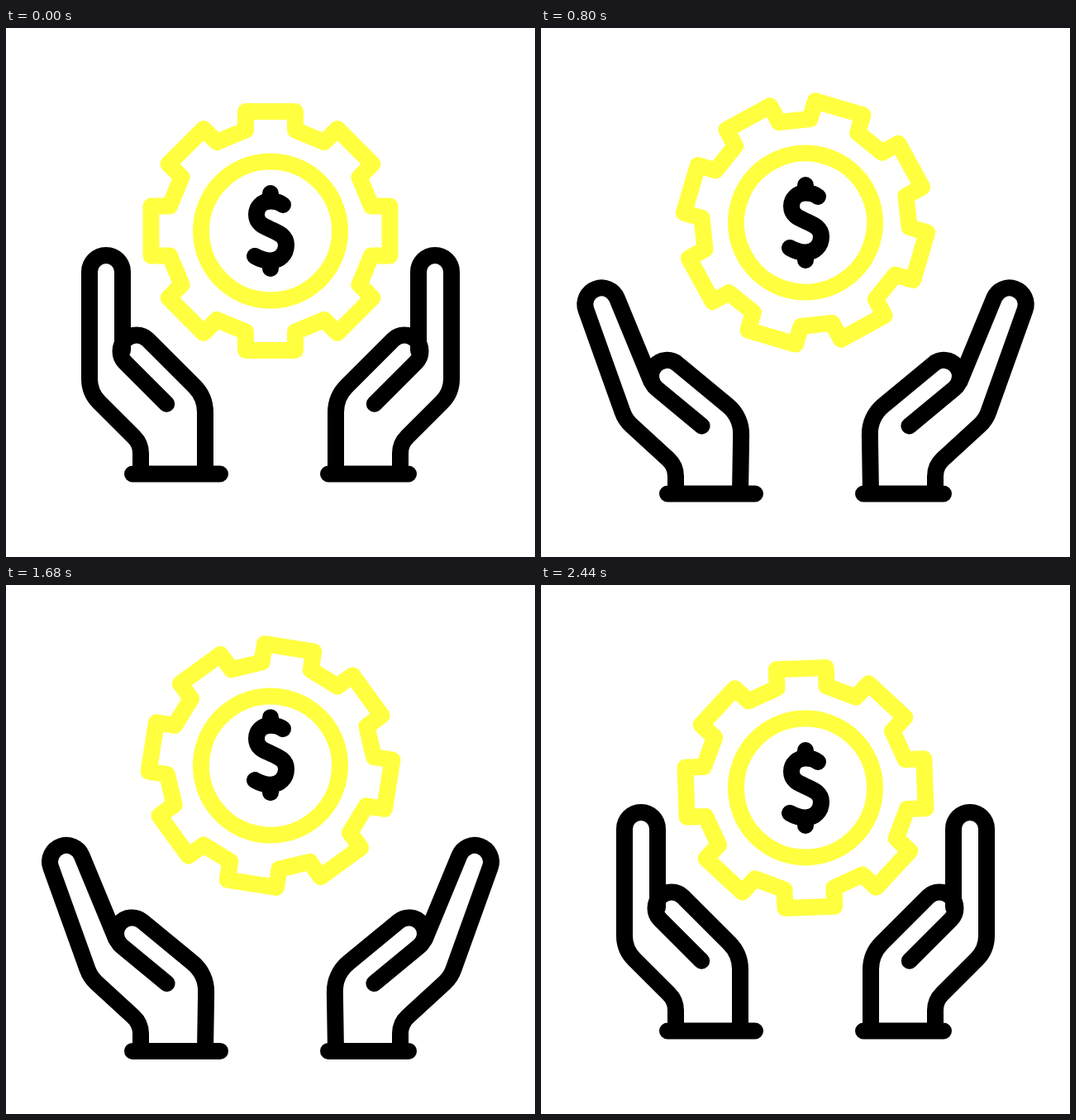
An HTML page with a canvas that plays this animation: 640 px wide and 640 px high, repeating every 2.48 s.

```html
<!DOCTYPE html>
<html lang="en">
<head>
<meta charset="utf-8">
<title>Hands and gear</title>
<style>
  html, body { margin: 0; width: 100%; height: 100%; overflow: hidden; background: #fff; }
  canvas { display: block; width: 100vmin; height: 100vmin; }
</style>
</head>
<body>
<canvas id="stage" width="640" height="640"></canvas>
<script>
const ctx = document.getElementById('stage').getContext('2d');
const STEP = 40, STEPS = 62;
const BLACK = '#000', YELLOW = '#ffff40';
const DIP = 19, THROW = 29.5, REACH = 42.5, CATCH = 50, REST = 57;

const rad = deg => deg * Math.PI / 180;
const ease = u => u * u * (3 - 2 * u);

// Starts at 0 and eases to each [time, value]; warp > 1 delays a move, < 1 hastens it.
function track(...moves) {
  return t => {
    let start = 0, from = 0;
    for (const [end, value, warp = 1] of moves) {
      if (t < end) {
        const u = Math.max(0, (t - start) / (end - start));
        return from + (value - from) * ease(u ** warp);
      }
      start = end;
      from = value;
    }
    return from;
  };
}

// Every part of the hands opens fully twice, around the throw and before the catch.
const handTrack = (thrown, caught, windUp) =>
  track([DIP, 1, windUp], [THROW, thrown], [REACH, 1], [CATCH, caught], [REST, 0]);

const drop = handTrack(0.16, -0.27, 2.4);
const fingerBend = handTrack(0.72, -0.16, 2.3);
const palmBend = handTrack(0.42, -0.85, 3.7);
const gearY = track([10, 24], [36, -31, 0.57], [49.5, 23, 2.2], [REST, 0]);
const coinY = t => 1.37 * gearY(t - 1);

// Six teeth per loop, slow near the rest pose and fastest after the throw.
function gearAngle(t) {
  const w = 2 * Math.PI * t / STEPS;
  return 270 * t / STEPS
    - 19.9 * Math.sin(w) - 9.5 * (1 - Math.cos(w))
    - 2.7 * Math.sin(2 * w) + 2.4 * (1 - Math.cos(2 * w))
    + Math.sin(3 * w);
}

function swishAngle(t, start, end) {
  const u = Math.min(1, Math.max(0, (t - start) / (end - start)));
  return -60 + 120 * ease(u);
}

function drawGear(y, angle) {
  ctx.save();
  ctx.translate(320, 245.5 + y);
  ctx.rotate(rad(angle));
  ctx.strokeStyle = YELLOW;
  ctx.beginPath();
  for (let i = 0; i < 8; i++) {
    ctx.lineTo(-30, -122);
    ctx.lineTo(-30, -144.5);
    ctx.lineTo(30, -144.5);
    ctx.lineTo(30, -122);
    ctx.rotate(Math.PI / 4);
  }
  ctx.closePath();
  ctx.moveTo(84, 0);
  ctx.arc(0, 0, 84, 0, 2 * Math.PI);
  ctx.stroke();
  ctx.restore();
}

const dollar = new Path2D('M15-31.5C11-35 5-36 0-36C-10-36-17-29-17-20C-17-9-9-6 1-1.5' +
  'C11 3 19 6.5 19 17C19 28 11 36 0 36C-7 36-13 34-19 30.5M0-45.5V-37M0 37V45.5');

function drawDollar(y) {
  ctx.save();
  ctx.translate(320, 245.5 + y);
  ctx.stroke(dollar);
  ctx.restore();
}

function drawSwish(tail, head) {
  if (head - tail < 0.5) return;
  ctx.beginPath();
  ctx.arc(320.8, 226.6, 194.6, rad(tail - 90), rad(head - 90));
  ctx.stroke();
}

function drawHand(t, cuffEnd) {
  const finger = fingerBend(t), palm = palmBend(t);
  const tipX = 121 - 48 * finger, tipY = 295 + 15.5 * Math.max(0, finger);
  const left = rad(20 * finger), right = rad(23 * finger);
  const knuckleX = 101 + palm, knuckleY = 441 + 9 * palm;
  const thumbX = 158 - 5.5 * palm, thumbY = 391 + 6.5 * palm, thumbR = 19.5;
  const lean = rad(45 - 5.5 * palm), c = Math.cos(lean), s = Math.sin(lean);
  const startX = thumbX - thumbR * s, startY = thumbY + thumbR * c;
  const heelX = 241 + 1.5 * palm;
  const heelY = thumbY - thumbR * c + (heelX - thumbX - thumbR * s) * s / c;

  ctx.save();
  ctx.translate(0, 539.5 + 24.5 * drop(t));
  ctx.beginPath();
  // Cuff
  ctx.moveTo(153, 0);
  ctx.lineTo(cuffEnd, 0);
  ctx.translate(0, -539.5);
  // Finger and outer edge of the palm
  ctx.moveTo(163, 539.5);
  ctx.arcTo(163, 503 + 3 * palm, knuckleX, knuckleY, 28);
  ctx.arcTo(knuckleX, knuckleY, tipX - 20 * Math.cos(left), tipY + 20 * Math.sin(left), 40);
  ctx.arc(tipX, tipY, 20, Math.PI - left, 2 * Math.PI - right);
  ctx.lineTo(thumbX - 17 - 2 * palm, thumbY - 1 + 8 * palm);
  // Thumb and inner edge of the palm
  ctx.moveTo(startX + 70.7 * c, startY + 70.7 * s);
  ctx.lineTo(startX, startY);
  ctx.arc(thumbX, thumbY, thumbR, lean + Math.PI / 2, lean + 1.5 * Math.PI);
  ctx.arcTo(heelX, heelY, 241, 539.5, 45);
  ctx.lineTo(241, 539.5);
  ctx.stroke();
  ctx.restore();
}

function draw(t) {
  ctx.fillStyle = '#fff';
  ctx.fillRect(0, 0, 640, 640);
  ctx.lineWidth = 20;
  ctx.lineCap = ctx.lineJoin = 'round';
  ctx.strokeStyle = BLACK;

  drawGear(gearY(t), gearAngle(t));
  drawDollar(coinY(t));
  drawSwish(swishAngle(t, 24, 29), swishAngle(t, 20, 27.7));

  drawHand(t, 259);
  ctx.save();
  ctx.translate(640, 0);
  ctx.scale(-1, 1);
  drawHand(t, 250);
  ctx.restore();
}

function tick() {
  draw(Math.floor(performance.now() / STEP) % STEPS);
  requestAnimationFrame(tick);
}
tick();
</script>
</body>
</html>
```
